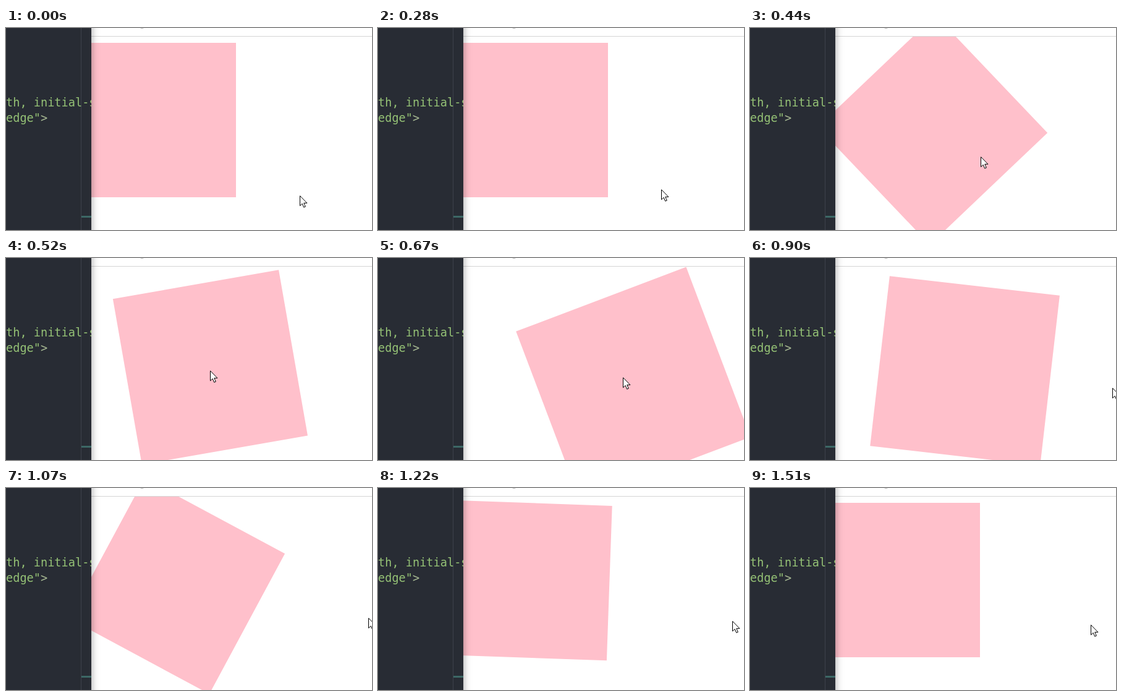
An HTML page that plays this animation: 592 by 327 pixels, repeating every 1.68 s.

```html
<!DOCTYPE html>
<html lang="en">
<head>
<meta charset="utf-8">
<title>Hover transition</title>
<style>
  html, body { margin: 0; width: 100%; height: 100%; overflow: hidden; background: #fff; }
  .stage { position: relative; width: 592px; height: 327px; overflow: hidden; background: #fff; }
  .stage * { position: absolute; }
  .bar { left: 0; top: 0; width: 592px; height: 13px; overflow: hidden; border-bottom: 1px solid #d5d5d5; }
  .tab { left: 216px; top: -7px; width: 8px; height: 8px; border-radius: 4px; background: #b4b4b4; }
  .page { left: 0; top: 14px; width: 592px; height: 313px; overflow: hidden; }
  .box { left: 122px; top: 10px; width: 250px; height: 250px; background: #ffc0cb; }
  .editor { left: -20px; top: -20px; width: 158px; height: 367px; background: #282c34; box-shadow: 0 0 12px rgba(0, 0, 0, .38); }
  .code { left: 0; top: 0; width: 138px; height: 327px; overflow: hidden; }
  .ruler { left: 121px; top: 0; width: 1px; height: 327px; background: #3d424b; }
  .mark { left: 122px; top: 304px; width: 16px; height: 3px; background: #3c6866; }
  text { font: 18.6px "DejaVu Sans Mono", "Noto Sans Mono", monospace; fill: #94c175; white-space: pre; }
  .end { fill: #a7b993; }
  .cursor { left: 0; top: 0; width: 14px; height: 21px; }
</style>
</head>
<body>
<div class="stage">
  <div class="bar"><div class="tab"></div></div>
  <div class="page"><div class="box" id="box"></div></div>
  <div class="editor"></div>
  <div class="code">
    <div class="ruler"></div>
    <div class="mark"></div>
    <svg width="138" height="327">
      <text x="0" y="127">th, initial-s</text>
      <text x="0" y="152">edge"<tspan class="end">&gt;</tspan></text>
    </svg>
  </div>
  <svg class="cursor" id="cursor" viewBox="0 0 14 21">
    <path d="M.5 .7V16.8L4.2 13.4L6.7 19.3L9.3 18.2L6.8 12.4H11.9Z" fill="#fff" stroke="#000"/>
  </svg>
</div>
<script>
  const LOOP = 1680, REST = 280, TICK = 76.8, SETTLED = 13;

  // pointer waypoints: tick, x, y
  const path = [
    [-1, 475, 271], [0, 458, 261], [3, 330, 182], [5, 396, 193],
    [7, 586, 210], [10, 586, 210], [13, 566, 217], [14, 552, 221], [16, 551, 221]
  ];
  const box = document.getElementById('box');
  const cursor = document.getElementById('cursor');
  const start = performance.now();

  function pointerAt(tick) {
    const next = path.findIndex(p => p[0] > tick);
    if (next < 0) return path.at(-1).slice(1);
    const [t0, x0, y0] = path[next - 1];
    const [t1, x1, y1] = path[next];
    const u = (tick - t0) / (t1 - t0);
    return [x0 + (x1 - x0) * u, y0 + (y1 - y0) * u];
  }

  // accelerates while hovered, then eases back to rest
  function progressAt(tick) {
    const out = .0507 * Math.max(0, tick) ** 1.346;
    const back = .0056 * Math.max(0, SETTLED - tick) ** 2.404;
    return Math.min(out, back);
  }

  function draw(now) {
    const t = Math.max(0, now - start) % LOOP;
    const tick = Math.max(-1, Math.floor((t - REST) / TICK));
    const p = progressAt(tick);
    const [x, y] = pointerAt(tick);
    box.style.transform =
      `translate(${150 * p}%, ${50 * p}%) rotate(${360 * p}deg) scale(${1 + .4 * p})`;
    cursor.style.transform = `translate(${Math.round(x)}px, ${Math.round(y)}px)`;
    requestAnimationFrame(draw);
  }
  draw(start);
</script>
</body>
</html>
```
